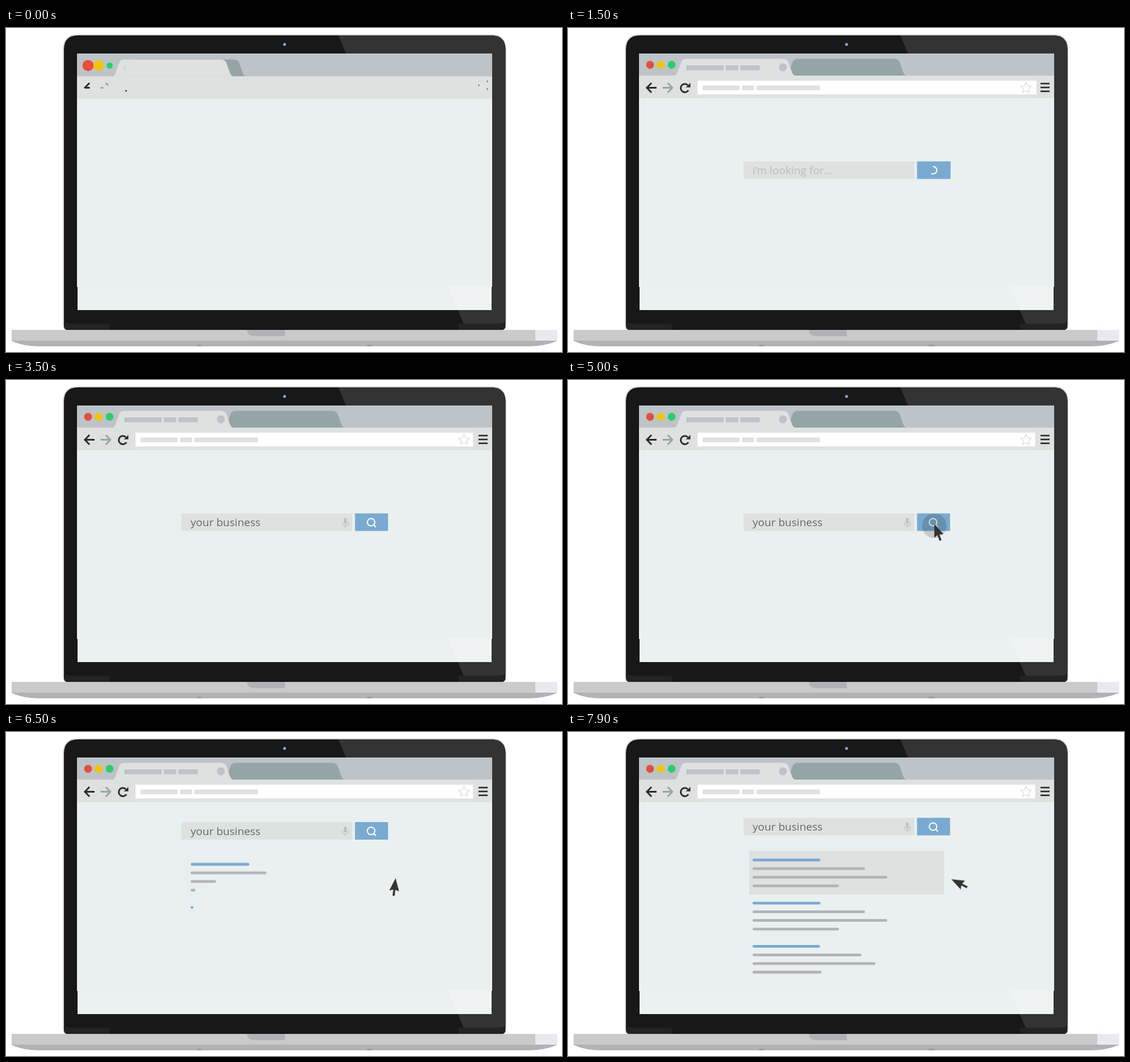
Recreate the animation shown at these times as an HTML page. Size 979x572 px, loop 8000 ms.

```html
<!DOCTYPE html>
<html lang="en">
<head>
<meta charset="utf-8">
<title>Laptop search</title>
<style>
  html, body { margin: 0; width: 100%; height: 100%; overflow: hidden; background: #fff; }
  svg { display: block; width: 100vw; height: 100vh; }
  svg { --loop: 8s; --snap: cubic-bezier(.57, 0, .03, 1); }
  text { font: 19px "Open Sans", "Noto Sans", sans-serif; white-space: pre; }

  .grow, .grow-r, .pop { transform-box: fill-box; transform-origin: 0 50%; }
  .grow-r { transform-origin: 100% 50%; }
  .pop { transform-origin: 50% 50%; }
  .grow, .grow-r, .move { animation: var(--k) var(--loop) var(--snap) infinite; }
  .pop, .ease { animation: var(--k) var(--loop) ease-out infinite; }
  .trim { fill: none; stroke-dasharray: 1 2; animation: var(--k) var(--loop) linear infinite; }
  .show { animation: var(--k) var(--loop) step-end infinite; }

  /* browser frame */
  @keyframes settle { 0% { translate: 0 1.3px } 4%, to { translate: 0 0 } }
  @keyframes light {
    0% { scale: var(--a) } 2.5% { scale: var(--b) } 5% { scale: var(--c) } 9%, to { scale: 1 }
  }
  @keyframes slide {
    0% { translate: -175px 0; animation-timing-function: cubic-bezier(.2, .6, .2, 1) }
    4.7%, to { translate: 0 0 }
  }
  @keyframes label { 0%, .6% { scale: .01 1 } 13.1%, to { scale: 1 1 } }
  @keyframes drop { 0% { translate: 0 -34px } 5% { translate: 0 -19.5px } 10%, to { translate: 0 0 } }
  @keyframes arrow { 0% { stroke-dashoffset: var(--o) } 3.75%, to { stroke-dashoffset: 0 } }
  @keyframes reload { 0% { stroke-dashoffset: .94 } 5% { stroke-dashoffset: .5 } 11%, to { stroke-dashoffset: 0 } }
  @keyframes head { 0%, 1% { scale: 0 } 5% { scale: .95 } 8%, to { scale: 1 } }
  @keyframes address { 0%, 1.1% { scale: 0 1 } 13.6% { scale: 1.004 1 } 20% { scale: 1.004 1 } 30%, to { scale: 1 1 } }
  @keyframes url { 0%, 2.1% { scale: 0 1 } 14.6%, to { scale: 1 1 } }
  @keyframes bars { 0%, 1.3% { scale: .07 1 } 13.8%, to { scale: 1 1 } }
  @keyframes barsY { 0%, 4% { translate: 0 -4px } 11%, to { translate: 0 0 } }
  @keyframes star { 0%, 11% { scale: 0 } 15% { scale: 1.12 } 17.5%, to { scale: 1 } }

  /* search box */
  @keyframes field { 0%, 7% { scale: 0 1 } 17.5%, to { scale: 1 1 } }
  @keyframes button { 0%, 10% { scale: 0 1 } 17.5%, 25% { scale: 1.017 1 } 31%, to { scale: 1 1 } }
  @keyframes lens { 0%, 15.5% { stroke-dashoffset: 1 } 18.75% { stroke-dashoffset: .42 } 22%, to { stroke-dashoffset: 0 } }
  @keyframes handle { 0%, 21.5% { stroke-dashoffset: 1 } 23.75%, to { stroke-dashoffset: 0 } }
  @keyframes mic { 0%, 19.5% { scale: 0 } 22.5% { scale: 1.1 } 24%, to { scale: 1 } }

  /* text, one letter at a time */
  @keyframes hintOn { 0% { opacity: 0 } 12.5% { opacity: 1 } 36%, to { opacity: 0 } }
  @keyframes queryOn { 0% { opacity: 0 } 36.5%, to { opacity: 1 } }
  @keyframes hintIn { 0% { fill: transparent } 13%, to { fill: #b9bbbb } }
  @keyframes hintOut { 0% { fill-opacity: 1 } 26.9%, to { fill-opacity: 0 } }
  @keyframes queryIn { 0% { fill: transparent } 37%, to { fill: #666 } }
  .hint tspan {
    fill: transparent;
    animation: hintIn 8s step-end calc(var(--i) * 20ms) infinite,
               hintOut 8s step-end calc((16 - var(--i)) * 38ms) infinite;
  }
  .query tspan { fill: transparent; animation: queryIn 8s step-end calc(var(--i) * 40ms) infinite; }

  /* results */
  @keyframes rise { 0%, 73.75% { translate: 0 0 } 86.25%, to { translate: 0 -84px } }
  @keyframes card { 0%, 80.75% { width: 0 } 93.25%, to { width: 343.5px } }
  @keyframes resultsOn { 0% { opacity: 0 } 74.5%, to { opacity: 1 } }
  @keyframes line { 0%, 74.58% { width: 0 } 74.59% { width: 5px } 87.1%, to { width: var(--w) } }
  .line { width: 0; animation: line 8s var(--snap) calc(var(--i) * 133ms) infinite; }

  /* pointer */
  @keyframes pointerOn { 0% { opacity: 0 } 48.75%, to { opacity: 1 } }
  @keyframes pointer {
    0%, 48.5% { transform: translate(812px, 459px) rotate(0deg); animation-timing-function: cubic-bezier(.4, 0, .2, 1) }
    58.75%, 73.75% { transform: translate(645px, 254px) rotate(0deg); animation-timing-function: ease-in-out }
    81.25% { transform: translate(686px, 258px) rotate(27deg); animation-timing-function: ease-in-out }
    91.25% { transform: translate(690px, 258px) rotate(-10deg); animation-timing-function: linear }
    95% { transform: translate(685px, 258px) rotate(-28deg); animation-timing-function: linear }
    98.75% { transform: translate(675px, 260px) rotate(-42.5deg); animation-timing-function: linear }
    to { transform: translate(671px, 261px) rotate(-46deg) }
  }
  @keyframes ripple {
    0%, 59.4% { r: 0; opacity: .15 }
    62.5% { r: 21.5px; opacity: .15 }
    67.5%, to { r: 31px; opacity: 0 }
  }
</style>
</head>
<body>
<svg viewBox="0 0 979 572" preserveAspectRatio="none">
  <defs>
    <clipPath id="screen"><rect x="125" y="45" width="731" height="412"/></clipPath>
    <path id="tab" d="M188 84Q191 83 192.500 79L199 61Q201 54.500 207 54.500H379Q385.500 54.500 388 60L394 77Q396 83.500 400 84Z"/>
  </defs>

  <!-- lid -->
  <path d="M100 525V38Q100 11 127 11H854Q881 11 881 38V525Q881 533 873 533H108Q100 533 100 525Z" fill="#d9d9d9"/>
  <path d="M102 525V38Q102 13 127 13H854Q879.500 13 879.500 38V525Q879.500 533 873 533H108Q102 533 102 525Z" fill="#181818"/>
  <path d="M585 13H854Q879.500 13 879.500 38V512Q879.500 522 869 522H806Z" fill="#333"/>
  <path d="M104 519Q107 522 114 522H183L182 533H108Q104 533 104 527Z" fill="#232323"/>
  <path d="M796 522H869Q876 522 879 518V527Q878 533 873 533H797Z" fill="#232323"/>
  <circle cx="490.500" cy="29" r="3.400" fill="#10202c"/>
  <circle cx="490.500" cy="29" r="2.500" fill="#7fb0d6"/>
  <rect x="126" y="456" width="729" height="42" fill="#ebf0f1"/>
  <path d="M779 457H855V498H796Z" fill="#eff3f4"/>

  <!-- base -->
  <path d="M10 551H970V552.500Q948 562 920 562H60Q30 562 10 552.500Z" fill="#b1b1b6"/>
  <rect x="10" y="533" width="960" height="19" fill="#cacaca"/>
  <rect x="932" y="533" width="38.500" height="19" fill="#e9eaf0"/>
  <path d="M424 533H491V544H435Q425 543 424 533Z" fill="#b1b1b6"/>
  <g fill="#98989d"><ellipse cx="340.500" cy="560.500" rx="5" ry="1.300"/><ellipse cx="639.500" cy="560.500" rx="5" ry="1.300"/></g>

  <g clip-path="url(#screen)">
    <rect x="125" y="45" width="731" height="413" fill="#eaf0f0"/>

    <g class="ease" style="--k:settle">
      <rect x="125" y="43" width="731" height="42" fill="#bdc3c7"/>
      <g class="move" style="--k:slide"><use href="#tab" x="196" fill="#95a5a6"/></g>
      <rect x="125" y="84" width="731" height="40" fill="#dfe1e1"/>
      <use href="#tab" fill="#dfe1e1"/>
      <g class="grow" style="--k:label" fill="#bdc3c7">
        <rect x="208.500" y="66" width="65.500" height="8.500"/>
        <rect x="278" y="66" width="21.500" height="8.500"/>
        <rect x="303.500" y="66" width="34" height="8.500"/>
      </g>
      <circle class="ease" style="--k:drop" cx="378.300" cy="69.500" r="7" fill="#bdc3c7"/>
      <circle class="pop" style="--k:light;--a:1.43;--b:.96;--c:.97" cx="144.500" cy="65" r="6.900" fill="#e74c3c"/>
      <circle class="pop" style="--k:light;--a:1.35;--b:1.1;--c:.9" cx="163" cy="65" r="6.900" fill="#f1c40f"/>
      <circle class="pop" style="--k:light;--a:.8;--b:1.3;--c:.92" cx="182.500" cy="65" r="6.900" fill="#2ecc71"/>
    </g>

    <g stroke="#2b2b2b" stroke-width="3">
      <path class="trim" pathLength="1" style="--k:arrow;--o:.5" d="M147 97L138.800 105.500L147 114"/>
      <path class="trim" pathLength="1" style="--k:arrow;--o:.5" d="M139 105.500H156"/>
      <g stroke="#95a5a6">
        <path class="trim" pathLength="1" style="--k:arrow;--o:.75" d="M175.500 97L183.700 105.500L175.500 114"/>
        <path class="trim" pathLength="1" style="--k:arrow;--o:.7" d="M166.500 105.500H183.500"/>
      </g>
      <path class="trim" pathLength="1" style="--k:reload" d="M212 110A7.300 7.300 0 1 1 211 101"/>
    </g>
    <path class="pop" style="--k:head" d="M215.500 97V104.800H207.500Z" fill="#2b2b2b"/>

    <rect class="grow" style="--k:address" x="228" y="93" width="594.500" height="24.300" fill="#fff"/>
    <g class="grow" style="--k:url" fill="#dfe1e1">
      <rect x="237" y="101.500" width="65" height="8.500"/>
      <rect x="306.500" y="101.500" width="21" height="8.500"/>
      <rect x="332" y="101.500" width="111.500" height="8.500"/>
    </g>
    <g transform="translate(806.500 105.500)">
      <path class="pop" style="--k:star" d="M0-9.500L2.900-3.400 9.500-2.800 4.600 1.700 6 8.200 0 4.900-6 8.200-4.600 1.700-9.500-2.800-2.900-3.400Z" fill="none" stroke="#d9dbdb" stroke-width="1.200" stroke-linejoin="round"/>
    </g>
    <g class="ease" style="--k:barsY" fill="#2b2b2b">
      <rect class="grow-r" style="--k:bars" x="832" y="96.800" width="16" height="2.700"/>
      <rect class="grow" style="--k:bars" x="832" y="103.600" width="16" height="2.700"/>
      <rect class="grow-r" style="--k:bars" x="832" y="110.400" width="16" height="2.700"/>
    </g>

    <g class="move" style="--k:rise">
      <rect class="grow" style="--k:field" x="309" y="235.500" width="301" height="31" fill="#dfe1e1"/>
      <rect class="grow" style="--k:button" x="614.500" y="235.500" width="58.200" height="31" fill="#7aaad0"/>
      <g stroke="#fff" stroke-width="2">
        <path class="trim" pathLength="1" style="--k:lens" d="M642.800 244.400a6.600 6.600 0 0 1 0 13.200a6.600 6.600 0 0 1 0-13.200"/>
        <path class="trim" pathLength="1" style="--k:handle" d="M647.300 255.700L651.300 259.700"/>
      </g>
      <g class="pop" style="--k:mic">
        <rect x="594.900" y="243.500" width="5.200" height="10.500" rx="2.600" fill="#bdc3c7"/>
        <path d="M592.200 250.500V252A5.300 5.300 0 0 0 602.800 252V250.500M597.500 257V260.500" fill="none" stroke="#bdc3c7" stroke-width="1.500"/>
      </g>
      <g class="show" style="--k:hintOn"><text class="hint" x="325" y="258" data-text="i’m looking for..."></text></g>
      <g class="show" style="--k:queryOn"><text class="query" x="325" y="258" data-text="your business"></text></g>

      <g class="show" style="--k:resultsOn">
        <rect class="move" style="--k:card" x="319" y="294" height="77" fill="#dfe1e1"/>
        <g id="results"></g>
      </g>
    </g>

    <circle class="ease" style="--k:ripple" cx="645" cy="257.500" r="0"/>
    <g class="show" style="--k:pointerOn">
      <path class="ease" style="--k:pointer" d="M0 0V24.500L5.500 19.800 9.200 30 12.800 28.500 8.800 18.700 16 18Z" fill="#333"/>
    </g>
  </g>
</svg>
<script>
  const make = (name, parent) =>
    parent.appendChild(document.createElementNS('http://www.w3.org/2000/svg', name));

  for (const el of document.querySelectorAll('text')) {
    [...el.dataset.text].forEach((ch, i) => {
      const span = make('tspan', el);
      span.textContent = ch;
      span.style.setProperty('--i', i);
    });
  }

  const widths = [119.5, 198, 237, 152];
  const results = document.getElementById('results');
  for (let i = 0; i < 12; i++) {
    const row = i % 4;
    const bar = make('rect', results);
    const attrs = {
      class: 'line', x: 325, height: 4.8, rx: 2.4,
      y: 307.6 + (i - row) / 4 * 76.2 + row * 15.2,
      fill: row ? '#b2b3b5' : '#7aaad0',
      style: `--i:${i};--w:${widths[row]}px`
    };
    for (const key in attrs) bar.setAttribute(key, attrs[key]);
  }
</script>
</body>
</html>
```
